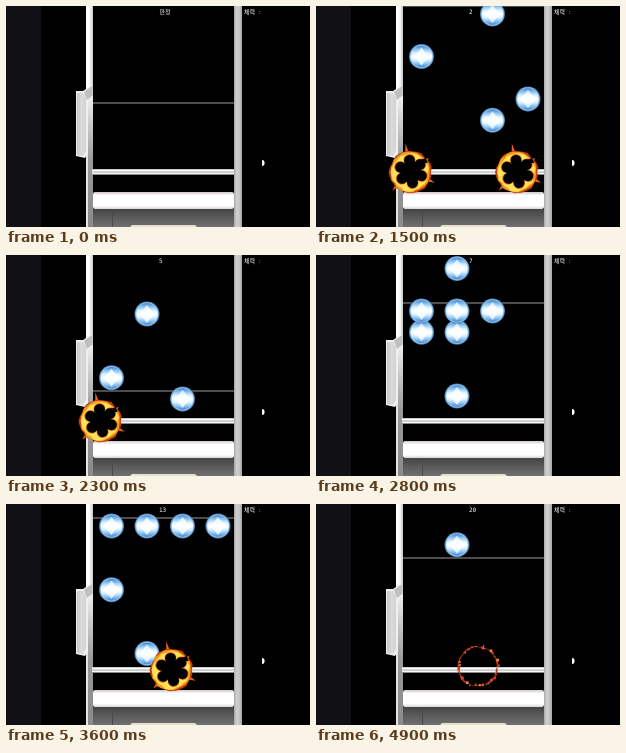
These frames come from a looping animation (304 by 221 pixels, 5 s). An HTML page with a canvas:

```html
<!DOCTYPE html>
<html lang="ko">
<head>
<meta charset="utf-8">
<style>
html, body { margin: 0; width: 100%; height: 100%; overflow: hidden; background: #000; }
canvas { display: block; width: 304px; height: 221px; }
</style>
</head>
<body>
<canvas id="stage" width="304" height="221"></canvas>
<script>
const ctx = document.getElementById('stage').getContext('2d');
const LOOP = 5000, STEP = 100;
const LANES = [105.5, 141, 176.5, 212];
const BAR = 170, EIGHTH = BAR / 8;
const SPAWN_Y = 0, HIT_Y = 163, BURST_END = 199;

// Scroll distance in pixels at given times.
const SCROLL = [[0, 97], [1200, 291.5], [1500, 340], [2300, 476], [2800, 558],
  [3600, 694], [4100, 779], [4900, 904], [5000, 920]];

// Eighth-note position: lanes played there.
const CHART = { 8: [0, 3], 11: [2], 12: [3], 14: [0], 16: [2], 17: [0], 20: [1],
  23: [0, 1], 24: [0, 1, 2], 26: [1], 29: [0], 32: [0, 1, 2, 3], 35: [2], 41: [1] };
const NOTES = Object.entries(CHART).flatMap(([beat, lanes]) =>
  lanes.map(lane => ({ beat: +beat, lane })));

function scrollAt(t) {
  const i = SCROLL.findIndex(p => p[0] > t);
  const [t0, d0] = SCROLL[i - 1], [t1, d1] = SCROLL[i];
  return d0 + (d1 - d0) * (t - t0) / (t1 - t0);
}

function random(seed) {
  return () => {
    seed = (seed * 16807) % 2147483647;
    return seed / 2147483647;
  };
}

function gradient(x0, y0, x1, y1, ...colors) {
  const g = ctx.createLinearGradient(x0, y0, x1, y1);
  colors.forEach((c, i) => g.addColorStop(i / (colors.length - 1), c));
  return g;
}

function rect(x, y, w, h, fill) {
  ctx.fillStyle = fill;
  ctx.fillRect(x, y, w, h);
}

function poly(points, fill) {
  ctx.beginPath();
  points.forEach(p => ctx.lineTo(p[0], p[1]));
  ctx.closePath();
  ctx.fillStyle = fill;
  ctx.fill();
}

function disc(x, y, r, fill) {
  ctx.beginPath();
  ctx.arc(x, y, r, 0, 7);
  ctx.fillStyle = fill;
  ctx.fill();
}

function text(str, x, y, font) {
  ctx.font = font;
  ctx.fillStyle = '#fff';
  ctx.fillText(str, x, y);
}

function drawBack() {
  rect(0, 0, 304, 221, '#000');
  rect(0, 0, 35, 221, '#111015');
}

function drawFrame() {
  // rails
  rect(80, 0, 7, 90, gradient(80, 0, 87, 0, '#fff', '#fff', '#ececec', '#c4c4c4'));
  rect(80, 90, 7, 131, gradient(0, 90, 0, 221, '#f0f0f0', '#9a9a9a', '#8a8a8a'));
  rect(80, 90, 2, 131, '#e4e4e4');
  rect(228, 0, 8, 221, gradient(228, 0, 236, 0, '#a8a8a8', '#cfcfcf', '#c6c6c6', '#a4a4a4'));
  // handle
  poly([[70, 85], [77, 85], [86, 79], [86, 91], [82, 95], [82, 147], [79, 152], [70, 150]], '#f0f0f0');
  poly([[71, 87], [77, 87], [80, 92], [80, 145], [77, 150], [71, 149]],
    gradient(71, 0, 80, 0, '#c8c8c8', '#dadada', '#d2d2d2'));
  poly([[78, 86], [86, 80], [86, 90], [81, 94]], '#bfbfbf');
  // lower deck
  rect(87, 203, 141, 18, gradient(0, 203, 0, 221, '#444', '#5c5c5c', '#707070'));
  rect(106, 204, 1, 17, '#4a4a4a');
  poly([[126, 219], [189, 219], [191, 221], [124, 221]], '#e8e0cf');
  ctx.beginPath();
  ctx.roundRect(87, 186, 141, 17, 2);
  ctx.fillStyle = gradient(0, 186, 0, 203, '#cfc8cb', '#fff', '#fff', '#fff', '#fff', '#d8d8d8');
  ctx.fill();
  // judgement bar
  rect(86, 163, 142, 6, gradient(0, 163, 0, 169, '#b0b0b0', '#fff', '#b8bdbb', '#f4f4f4', '#555'));
}

function drawNote(x, y) {
  disc(x, y, 12.5, '#4c7fb0');
  disc(x, y, 11.7, '#8dbfe8');
  disc(x, y, 10.7, gradient(0, y - 11, 0, y + 11,
    '#3f80cc', '#86c0f2', '#d8f0ff', '#fff', '#d8f0ff', '#86c0f2', '#3f80cc'));
  poly([[x, y - 9], [x + 4, y - 4], [x + 10, y], [x + 4, y + 4],
    [x, y + 9], [x - 4, y + 4], [x - 10, y], [x - 4, y - 4]], 'rgba(255,255,255,.75)');
}

function jaggedRing(cx, cy, outer, inner, rough, seed, fill) {
  const rnd = random(seed), count = 30;
  ctx.beginPath();
  for (const [r, amp] of [[outer, 2], [inner, rough]]) {
    for (let i = 0; i < count; i++) {
      const a = i / count * Math.PI * 2;
      const d = r + (rnd() - 0.5) * amp;
      const x = cx + Math.cos(a) * d, y = cy + Math.sin(a) * d;
      i ? ctx.lineTo(x, y) : ctx.moveTo(x, y);
    }
    ctx.closePath();
  }
  ctx.fillStyle = fill;
  ctx.fill('evenodd');
}

// Dark bubbles that leave flame tongues pointing inwards.
function hollow(cx, cy, low, depth, fill) {
  const points = [];
  for (let a = 0; a < Math.PI * 2; a += 0.05) {
    const r = low + depth * Math.sqrt(Math.abs(Math.sin(a * 3 + 0.4)));
    points.push([cx + Math.cos(a) * r, cy + Math.sin(a) * r]);
  }
  poly(points, fill);
}

function spike(cx, cy, angle, length, width, fill) {
  const at = (a, r) => [cx + Math.cos(a) * r, cy + Math.sin(a) * r];
  poly([at(angle - width, 18), at(angle, length), at(angle + width, 18)], fill);
}

function sparks(cx, cy, r, count, seed, colors) {
  const rnd = random(seed);
  for (let i = 0; i < count; i++) {
    const a = (i + rnd()) / count * Math.PI * 2;
    const d = r + (rnd() - 0.5) * 2.5, s = 1 + rnd() * 1.6;
    rect(cx + Math.cos(a) * d - s / 2, cy + Math.sin(a) * d - s / 2, s, s, colors[i % colors.length]);
  }
}

function drawBurst(lane, y) {
  const x = LANES[lane] - 11;
  if (y < 169.5) {
    jaggedRing(x - 3.5, 162.5, 20.3, 18.9, 1.8, 71, '#a5321a');
    sparks(x - 3.5, 162.5, 19.5, 30, 19, ['#e8502a', '#ff8a3c', '#c8371c']);
    spike(x - 3.5, 162.5, -1.3, 23, 0.1, '#e8502a');
  } else if (y < 174.5) {
    jaggedRing(x - 0.5, 162, 16.8, 14, 2, 37, '#d92a12');
    sparks(x - 0.5, 162, 15.5, 26, 53, ['#ffe84a', '#ff9a1e', '#ffd02e']);
  } else {
    for (const [a, len] of [[-1.75, 29], [0.42, 26.5], [2.35, 26], [-0.65, 23]]) {
      spike(x, 166, a, len, 0.12, '#e8641a');
    }
    jaggedRing(x, 166, 21.3, 0, 0, 11, '#c23a0e');
    jaggedRing(x, 166, 20.2, 0, 0, 23, '#f79a1a');
    jaggedRing(x - 0.5, 166.3, 18.6, 0, 0, 47, '#ffe258');
    hollow(x + 0.5, 165.5, 10, 7.6, '#e0701a');
    hollow(x + 0.5, 165.5, 9, 7.6, '#000');
    poly([[x + 10, 154], [x + 15, 152], [x + 17, 157], [x + 13, 157]], '#000');
  }
}

function draw(t) {
  const scroll = scrollAt(t);
  const noteY = n => scroll + 8 - n.beat * EIGHTH;

  drawBack();
  for (let y = scroll % BAR; y < 164; y += BAR) rect(87, Math.round(y) - 1, 141, 2, '#4d4d4d');
  drawFrame();

  let combo = 0;
  for (const n of NOTES) {
    const y = noteY(n);
    if (y >= HIT_Y) combo++;
    else if (y > SPAWN_Y) drawNote(LANES[n.lane], y);
  }
  for (const n of NOTES) {
    const y = noteY(n);
    // a burst already running in the lane is not restarted
    const busy = (CHART[n.beat - 1] || []).includes(n.lane);
    if (y >= HIT_Y && y < BURST_END && !busy) drawBurst(n.lane, y);
  }

  const korean = '500 6px "Noto Sans CJK KR", "Noto Sans CJK", sans-serif';
  if (combo) text(combo, 153, 8, '6px "DejaVu Sans Mono", monospace');
  else text('판정', 153.5, 8, korean);
  text('체력', 238, 8, korean);
  text(':', 253, 8, korean);
  ctx.beginPath();
  ctx.ellipse(256, 157, 2.6, 3, 0, -Math.PI / 2, Math.PI / 2);
  ctx.fillStyle = '#fff';
  ctx.fill();
}

const start = performance.now();
function tick() {
  const t = (performance.now() - start) % LOOP;
  draw(Math.floor(t / STEP) * STEP);
  requestAnimationFrame(tick);
}
tick();
</script>
</body>
</html>
```
